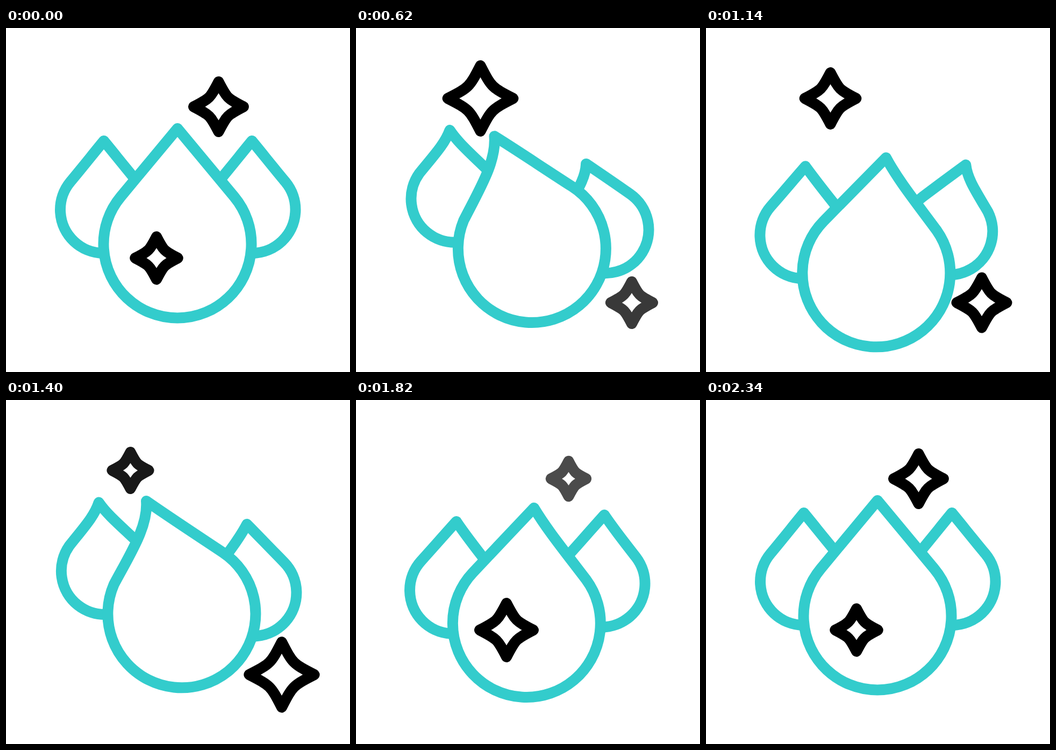
An HTML page for the animation above (2400 ms loop, 640 by 640 pixels).

```html
<!DOCTYPE html>
<html lang="en">
<head>
<meta charset="utf-8">
<title>Sparkling drops</title>
<style>
  html, body { margin: 0; width: 100%; height: 100%; overflow: hidden; background: #fff; }
  svg { display: block; width: 100%; height: 100%; }
  path { stroke-width: 20; stroke-linejoin: round; stroke-linecap: round; }
  .drop { fill: #fff; stroke: #3cc; }
  .star { fill: none; stroke: #000; }
</style>
</head>
<body>
<svg id="stage" viewBox="0 0 640 640"></svg>
<script>
const LOOP = 2400;
const LAG = 80;
const GROW = 230, SETTLE = 340, SWELL = 190, SHRINK = 230;
const OUT_PEAK = 1.32;
const REST = Math.acos(0.64); // angle from the top to where the flanks touch the circle

// [time, value] pairs
const bounce = [[0, 0], [362, 53], [720, -36], [1070, 54], [1440, -22], [1800, 16], [2160, 0]];
const sideBend = [[0, 0], [400, -38], [910, 35], [1300, -14], [1720, 6.5], [2160, 0]];
const midBend = [[0, 0], [320, -82], [460, -82], [900, 67], [1290, -67], [1700, 14], [2160, 0]];

const drops = [
  { x: 182, y: 338, r: 81, h: 128, bend: sideBend, sway: 0.17, dip: 0.0043, delay: 0 },
  { x: 457.5, y: 338, r: 81, h: 128, bend: sideBend, sway: 0.17, dip: 0.0043, delay: 2 * LAG },
  { x: 319, y: 402, r: 137.5, h: 215, bend: midBend, sway: 0.12, dip: 0.0012, delay: LAG }
];

const stars = [
  { x: 395.5, y: 146.5, size: 46.5, start: 1698, end: 72, peak: 1.27 },
  { x: 280, y: 428, size: 39.7, start: 1595, end: 0, peak: 1.26 },
  { x: 231.5, y: 131, size: 46.5, start: 380, end: 1104, peak: 1.31 },
  { x: 513, y: 511, size: 46.5, start: 485, end: 1195, peak: 1.31 }
];

const ease = x => (1 - Math.cos(Math.PI * x)) / 2;
const mix = (a, b, x) => a + (b - a) * ease(x);
const wrap = t => ((t % LOOP) + LOOP) % LOOP;
const pt = (x, y) => x.toFixed(2) + ' ' + y.toFixed(2);

function sample(keys, t) {
  if (t <= keys[0][0]) return keys[0][1];
  for (let i = 1; i < keys.length; i++) {
    const [t0, a] = keys[i - 1], [t1, b] = keys[i];
    if (t < t1) return mix(a, b, (t - t0) / (t1 - t0));
  }
  return keys[keys.length - 1][1];
}

function dropPath(d, t) {
  const local = t - d.delay;
  const bend = sample(d.bend, local);
  const lift = sample(bounce, local);
  const cx = d.x - d.sway * bend;
  const cy = d.y + lift;
  const h = d.h - d.dip * bend * bend;
  const tipX = cx + bend, tipY = cy - h;
  const tilt = Math.atan2(bend, h);
  const pinch = Math.max(0, -lift) * 0.009;

  // side: -1 left, 1 right; a flank curls inwards under the tip and while the drop is raised
  const flank = side => {
    const a = side * REST + tilt * 0.94;
    const x = cx + d.r * Math.sin(a), y = cy - d.r * Math.cos(a);
    const reach = Math.hypot(x - tipX, y - tipY);
    const curl = Math.max(0, side * tilt) * 1.4 + pinch;
    const up = a - side * curl * 0.18;
    const down = side * (Math.PI / 2 - REST - curl) - tilt;
    const k1 = reach * 0.42, k2 = reach * 0.28;
    return {
      end: pt(x, y),
      low: pt(x - side * Math.cos(up) * k1, y - side * Math.sin(up) * k1),
      high: pt(tipX + Math.sin(down) * k2, tipY + Math.cos(down) * k2)
    };
  };
  const l = flank(-1), r = flank(1), tip = pt(tipX, tipY);
  return `M${tip}C${r.high} ${r.low} ${r.end}A${d.r} ${d.r} 0 1 1 ${l.end}C${l.low} ${l.high} ${tip}Z`;
}

function starState(s, t) {
  const age = wrap(t - s.start);
  const out = age - wrap(s.end - s.start);
  if (age < GROW) {
    const x = age / GROW;
    return [mix(0, s.peak, x), Math.min(1, x / 0.76)];
  }
  if (age < GROW + SETTLE) return [mix(s.peak, 1, (age - GROW) / SETTLE), 1];
  if (out < 0) return [1, 1];
  if (out < SWELL) return [mix(1, OUT_PEAK, out / SWELL), 1];
  const x = (out - SWELL) / SHRINK;
  return x < 1 ? [mix(OUT_PEAK, 0, x), Math.min(1, (1 - x) / 0.59)] : [0, 0];
}

function starPath(s, scale) {
  const n = s.size * scale, c = n * 0.34;
  const at = (x, y) => pt(s.x + x, s.y + y);
  const edge = (cx, cy, x, y) => `C${at(cx, cy)} ${at(cx, cy)} ${at(x, y)}`;
  return `M${at(0, -n)}${edge(c, -c, n, 0)}${edge(c, c, 0, n)}` +
    `${edge(-c, c, -n, 0)}${edge(-c, -c, 0, -n)}Z`;
}

const stage = document.getElementById('stage');
function addPath(item, name) {
  item.el = document.createElementNS(stage.namespaceURI, 'path');
  item.el.setAttribute('class', name);
  stage.appendChild(item.el);
}
drops.forEach(d => addPath(d, 'drop'));
stars.forEach(s => addPath(s, 'star'));

function draw(t) {
  for (const d of drops) d.el.setAttribute('d', dropPath(d, t));
  for (const s of stars) {
    const [scale, opacity] = starState(s, t);
    s.el.setAttribute('d', starPath(s, scale));
    s.el.setAttribute('opacity', opacity.toFixed(3));
  }
}

const began = performance.now();
function tick() {
  draw(wrap(performance.now() - began));
  requestAnimationFrame(tick);
}
tick();
</script>
</body>
</html>
```
